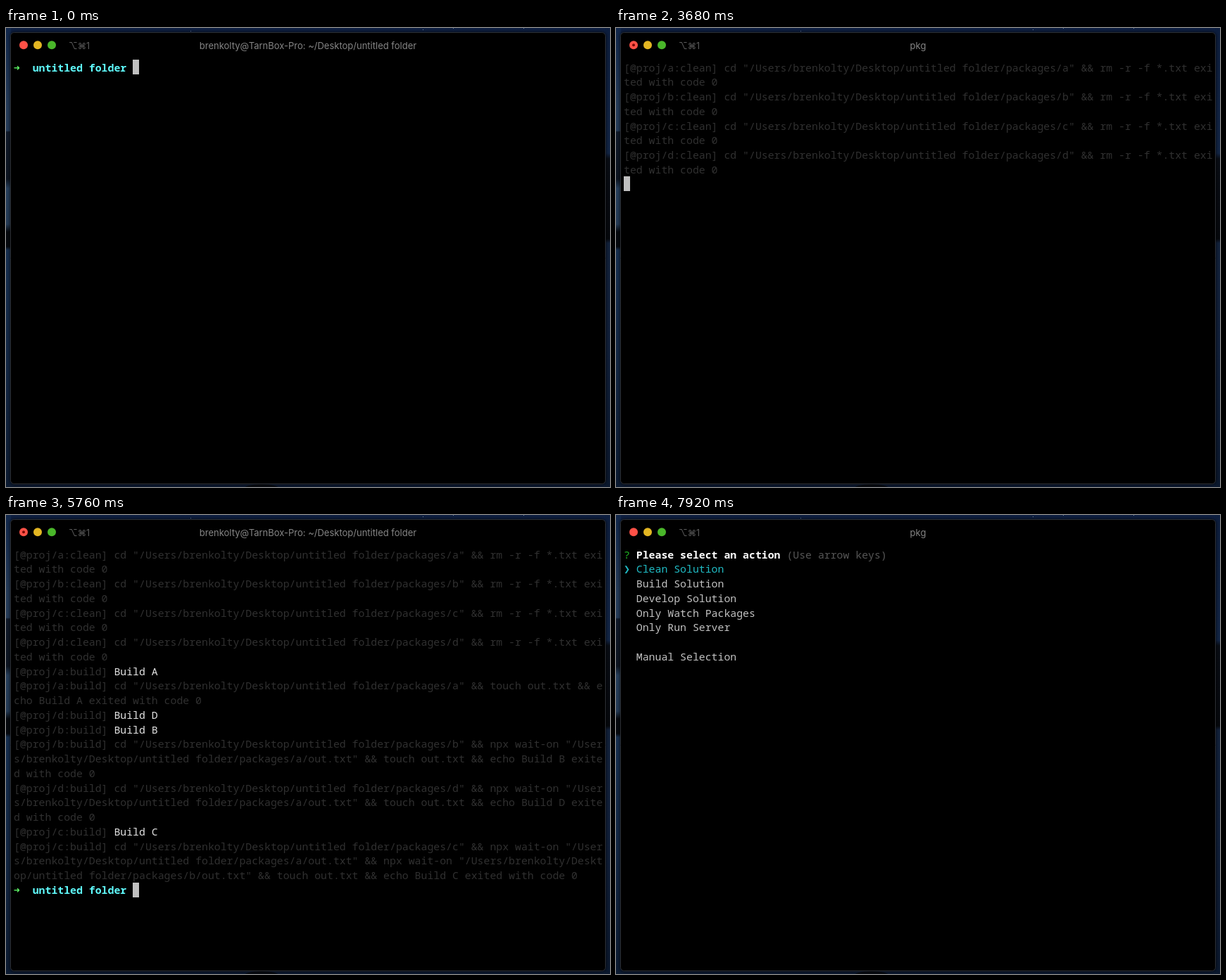
An HTML page with a canvas that plays this animation: 858x653 px, repeating every 8 s.

```html
<!DOCTYPE html>
<html lang="en">
<head>
<meta charset="utf-8">
<title>Terminal</title>
<style>
html, body { margin: 0; width: 100%; height: 100%; overflow: hidden; background: #0d1f3c; }
canvas { display: block; }
</style>
</head>
<body>
<canvas id="stage" width="858" height="653"></canvas>
<script>
const ctx = document.getElementById('stage').getContext('2d');
const LOOP = 8000, COLS = 94, CELL = 8.9, ROW = 20.75, LEFT = 11, TOP = 45.25;
const DIM = '#303030', PLAIN = '#c2c2c2', BRIGHT = '#e2e2e2', CYAN = '#20bbc4';
const HOME = '/Users/brenkolty/Desktop/untitled folder';
const SHELL_TITLE = 'brenkolty@TarnBox-Pro: ~/Desktop/untitled folder';

function rect(x, y, w, h, color) {
  ctx.fillStyle = color;
  ctx.fillRect(x, y, w, h);
}

function disc(x, y, r, color) {
  ctx.fillStyle = color;
  ctx.beginPath();
  ctx.arc(x, y, r, 0, 7);
  ctx.fill();
}

function shade(x, y, w, h, stops) {
  const g = ctx.createLinearGradient(0, 0, 0, 653);
  for (const [at, color] of stops) g.addColorStop(at / 653, color);
  rect(x, y, w, h, g);
}

// Characters sit on a fixed grid and wrap at the last column.
function put(row, col, text, color, weight = 400) {
  ctx.font = weight + ' 14.83px "Noto Sans Mono", "DejaVu Sans Mono", monospace';
  ctx.textAlign = 'left';
  ctx.textBaseline = 'alphabetic';
  ctx.fillStyle = color;
  [...text].forEach((ch, i) => {
    const c = col + i, y = TOP + 16.25 + (row + Math.floor(c / COLS)) * ROW;
    ctx.fillText(ch, LEFT + c % COLS * CELL, y);
  });
  return row + Math.ceil((col + text.length) / COLS);
}

function cursor(row, col) {
  rect(Math.round(LEFT + col * CELL), Math.round(TOP + row * ROW), 9, 21, '#c0c0c0');
}

function prompt(row, typed) {
  put(row, 0, '➜', '#5ffa68', 600);
  put(row, 3, 'untitled folder', '#60fdff', 600);
  put(row, 19, typed, PLAIN);
}

function menu(selected, hint) {
  put(0, 0, '?', '#20b422');
  put(0, 2, 'Please select an action', '#fff', 600);
  if (hint) put(0, 26, '(Use arrow keys)', '#565656');
  ['Clean Solution', 'Build Solution', 'Develop Solution', 'Only Watch Packages',
    'Only Run Server', '', 'Manual Selection'].forEach((item, i) => {
    const on = i === selected;
    if (on) put(i + 1, 0, '❯', CYAN);
    put(i + 1, 2, item, on ? CYAN : PLAIN);
  });
}

const done = (name, task, command) =>
  `[@proj/${name}:${task}] cd "${HOME}/packages/${name}" && ${command} exited with code 0`;

function build(name, ...needs) {
  const waits = needs.map(n => `npx wait-on "${HOME}/packages/${n}/out.txt" && `).join('');
  return done(name, 'build', `${waits}touch out.txt && echo Build ${name.toUpperCase()}`);
}

const echo = name => ({ tag: `[@proj/${name}:build]`, said: 'Build ' + name.toUpperCase() });

const log = [
  [3680, ...[...'abcd'].map(n => done(n, 'clean', 'rm -r -f *.txt'))],
  [3760, echo('a'), build('a')],
  [4640, echo('d'), echo('b'), build('b', 'a'), build('d', 'a')],
  [5520, echo('c'), build('c', 'a', 'b')]
];

function output(t) {
  let row = 0;
  for (const [start, ...lines] of log) {
    if (t < start) break;
    for (const line of lines) {
      if (line.tag) {
        put(row, 16, line.said, BRIGHT);
        row = put(row, 0, line.tag, DIM);
      } else {
        row = put(row, 0, line, DIM);
      }
    }
  }
  return row;
}

const typedAt = (t, times) => 'pkg'.slice(0, times.filter(at => t >= at).length);

function shell(row, t, times, enter) {
  const typed = typedAt(t, times);
  prompt(row, typed);
  if (t < enter) cursor(row, 19 + typed.length);
  else cursor(row + 1, 0);
}

function desktop() {
  shade(0, 0, 858, 653, [[0, '#0d1e40'], [320, '#14294a'], [653, '#0b182f']]);
  shade(0, 0, 7, 653, [[0, '#10264a'], [110, '#253c5a'], [146, '#253c5a'], [148, '#0f1929'],
    [215, '#0c1420'], [228, '#263f5c'], [279, '#243b57'], [290, '#05080d'], [311, '#05080d'],
    [316, '#162f50'], [480, '#132744'], [653, '#0b1a31']]);
  shade(851, 0, 7, 653, [[0, '#0c1d3d'], [178, '#122545'], [186, '#080c14'], [300, '#05070b'],
    [306, '#12213b'], [450, '#101f3a'], [653, '#0a172c']]);
  ctx.fillStyle = '#070a10';
  ctx.beginPath();
  ctx.ellipse(363, 656, 26, 7, 0, 0, 7);
  ctx.fill();
  for (const [x, y] of [[262, 4], [592, 2], [635, 0], [735, 0]]) rect(x, y, 1, 1, '#7486a5');
}

function frame(title, running) {
  ctx.beginPath();
  ctx.roundRect(6.5, 6.5, 845, 642, 5);
  ctx.shadowColor = '#000';
  ctx.shadowBlur = 5;
  ctx.fillStyle = '#000';
  ctx.fill();
  ctx.shadowBlur = 0;
  ctx.strokeStyle = '#2c2f34';
  ctx.lineWidth = 1;
  ctx.stroke();
  ['#ff5147', '#e3b622', '#4ab72a'].forEach((color, i) => disc(25 + 20 * i, 24.2, 6, color));
  if (running) disc(25, 24.2, 2, '#780a06');
  ctx.textBaseline = 'alphabetic';
  ctx.textAlign = 'left';
  ctx.font = '12.4px Inter, "DejaVu Sans", sans-serif';
  ctx.fillStyle = '#5c5c5c';
  ctx.fillText('⌥⌘1', 89, 29.5);
  ctx.textAlign = 'center';
  ctx.font = '13px Inter, "DejaVu Sans", sans-serif';
  ctx.fillStyle = '#858585';
  ctx.fillText(title, 429, 29.5);
}

function draw(t) {
  const busy = t >= 1680 && t < 5600 || t >= 7760;
  desktop();
  frame(busy ? 'pkg' : SHELL_TITLE, t >= 2480 && t < 6080);
  if (t < 2160) {
    shell(0, t, [880, 960, 1120], 1600);
  } else if (t < 3680) {
    menu(t < 2960 ? 0 : 1, t < 2960);
  } else if (t < 7920) {
    const row = output(t);
    if (t < 5600) cursor(row, 0);
    else shell(row, t, [7120, 7280, 7440], 7760);
  } else {
    menu(0, true);
  }
}

const start = performance.now();
function tick() {
  draw((performance.now() - start) % LOOP);
  requestAnimationFrame(tick);
}
tick();
</script>
</body>
</html>
```
